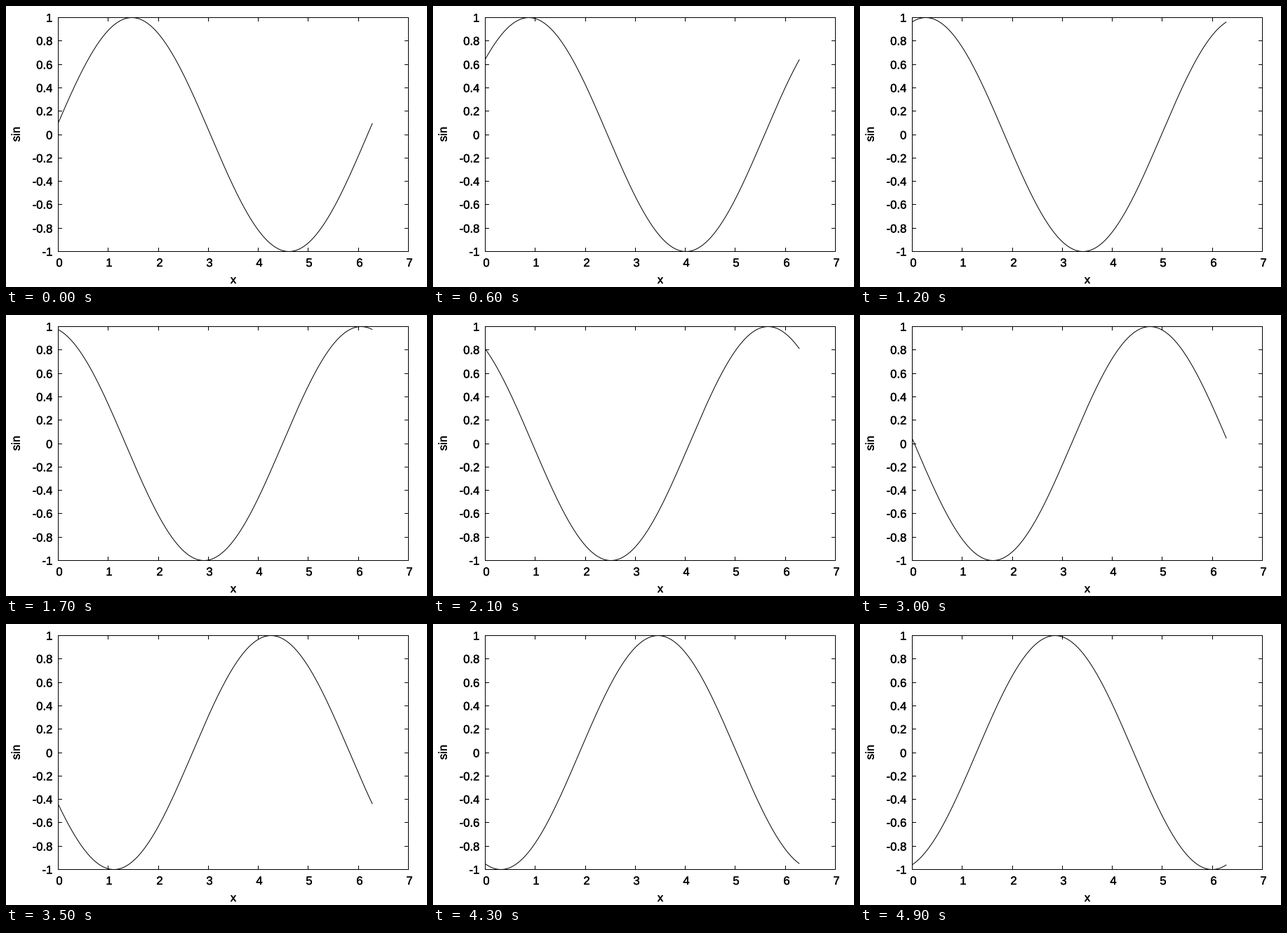
Animation of 600 by 400 pixels, one loop 5000 ms. Source, as a matplotlib script:

```python
import numpy as np
import matplotlib.pyplot as plt
from matplotlib import patheffects
from matplotlib.animation import FuncAnimation

WIDTH, HEIGHT, DPI = 600, 400, 100
FRAMES, INTERVAL = 50, 100
LEFT, RIGHT, TOP, BOTTOM = 74.5, 573.5, 16.5, 349.5
TICK = 5.5
PX = 72 / DPI

plt.rcParams.update({
    "font.family": "Liberation Sans",
    "font.size": 12,
    "text.hinting": "none",
    "lines.linewidth": PX,
})

fig = plt.figure(figsize=(WIDTH / DPI, HEIGHT / DPI), dpi=DPI, facecolor="white")
ax = fig.add_axes([0, 0, 1, 1])
ax.set_xlim(0, WIDTH)
ax.set_ylim(HEIGHT, 0)
ax.axis("off")

heavier = [patheffects.withStroke(linewidth=0.35 * PX, foreground="black")]


def px_x(x):
    return LEFT + (RIGHT - LEFT) * x / 7


def px_y(y):
    return (TOP + BOTTOM) / 2 - (BOTTOM - TOP) / 2 * y


def pixel_centre(v):
    return np.floor(v) + 0.5


def rule(xs, ys):
    ax.plot(xs, ys, color="black", snap=False,
            solid_capstyle="butt", solid_joinstyle="miter")


def label(x, y, text, ha="center", **style):
    ax.text(x, y, text, ha=ha, va="baseline", color="black",
            path_effects=heavier, **style)


rule([LEFT, RIGHT, RIGHT, LEFT, LEFT, RIGHT], [TOP, TOP, BOTTOM, BOTTOM, TOP, TOP])

for value in range(8):
    x = pixel_centre(px_x(value))
    rule([x, x], [BOTTOM, BOTTOM - TICK])
    rule([x, x], [TOP, TOP + TICK])
    label(x + 1.5, 371, str(value))

for value in np.arange(-5, 6) / 5:
    y = pixel_centre(px_y(value))
    rule([LEFT, LEFT + TICK], [y, y])
    rule([RIGHT, RIGHT - TICK], [y, y])
    label(66.3, y + 6, f"{value:g}", ha="right")

label(324, 395, "x")
label(19.7, 182.5, "sin", rotation=90, rotation_mode="anchor")

xs = np.linspace(0, 6.28, 315)
curve, = ax.plot([], [], color="black", snap=False, solid_capstyle="butt")


def update(frame):
    phase = 0.1 * (frame + 1)
    curve.set_data(px_x(xs), px_y(np.sin(xs + phase)))
    return curve,


anim = FuncAnimation(fig, update, frames=FRAMES, interval=INTERVAL,
                     repeat=True, repeat_delay=0)
plt.show()
```
